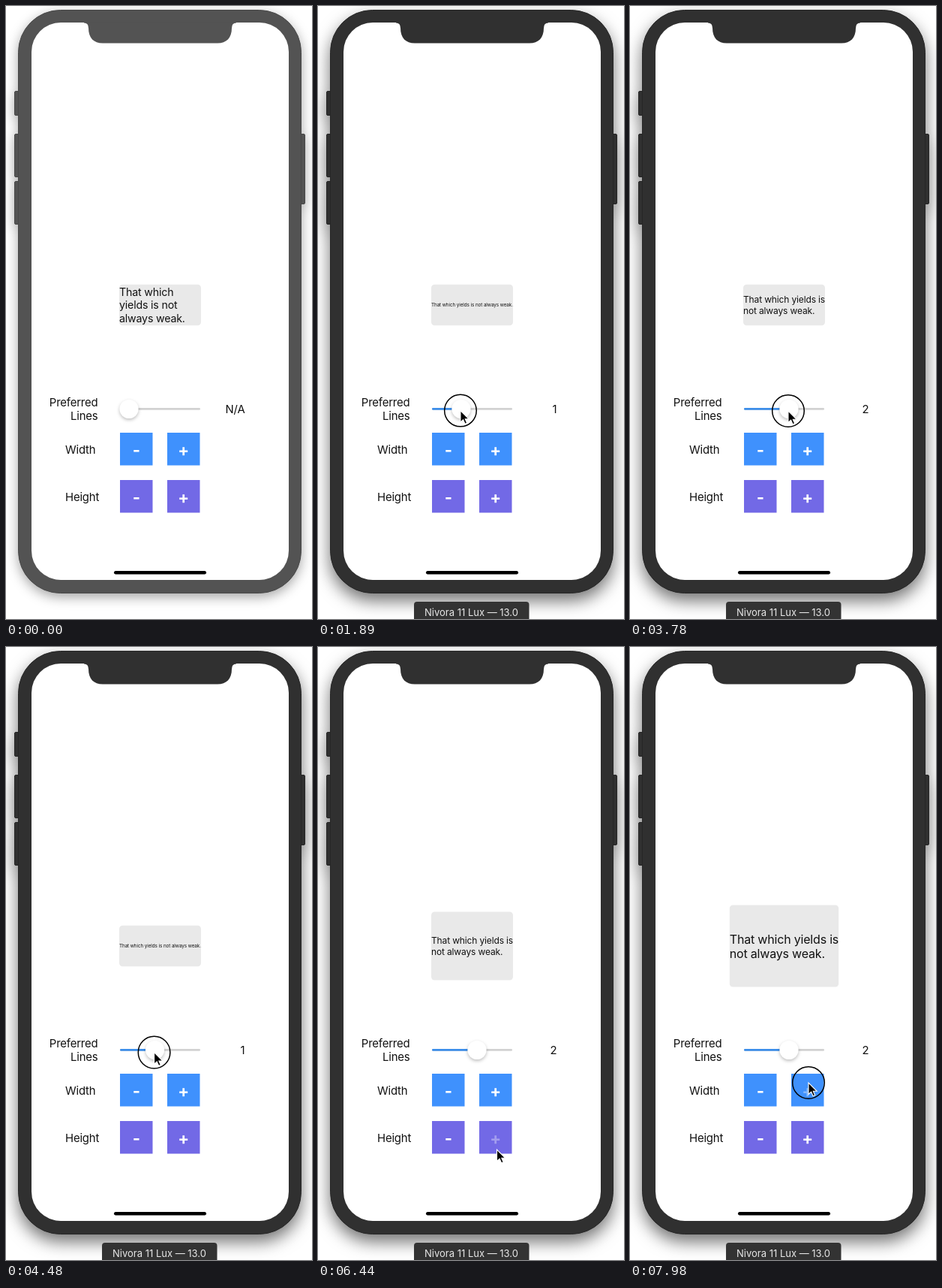
Recreate the animation shown at these times as an HTML page. Size 408 by 816 pixels, loop 8000 ms.

```html
<!DOCTYPE html>
<html lang="en">
<head>
<meta charset="utf-8">
<title>Preferred lines demo</title>
<style>
  html, body { margin: 0; width: 100%; height: 100%; overflow: hidden; background: #fff; }
  svg { display: block; width: 408px; height: 816px; }
  text { font: 14.9px Inter, "Liberation Sans", sans-serif; letter-spacing: -.012em; fill: #111; }
  .end { text-anchor: end; }
  .mid { text-anchor: middle; }
  .sign { font-size: 22px; font-weight: 700; fill: #fff; text-anchor: middle; }
  #phone { fill: #535353; stroke: #484848; filter: drop-shadow(0 5px 8px rgba(0,0,0,.35)); }
  #bezel { fill: #535353; }
  .active #phone { fill: #303030; stroke: #262626; filter: drop-shadow(0 10px 11px rgba(0,0,0,.55)); }
  .active #bezel { fill: #303030; }
  #tag { visibility: hidden; }
  .active #tag { visibility: visible; }
  #tag text { font-size: 13px; letter-spacing: 0; fill: #e8e8e8; }
  #knob { fill: #fff; filter: drop-shadow(0 2px 2px rgba(0,0,0,.25)); }
</style>
</head>
<body>
<svg id="stage" viewBox="0 0 408 816">
  <g id="phone">
    <rect x="11.5" y="113.5" width="8" height="32" rx="1.5"/>
    <rect x="11.5" y="170.5" width="8" height="57" rx="1.5"/>
    <rect x="11.5" y="233.5" width="8" height="57" rx="1.5"/>
    <rect x="390" y="170.5" width="8.5" height="93" rx="1.5"/>
    <rect x="16.5" y="5.5" width="377" height="776" rx="56"/>
  </g>
  <rect x="34" y="22" width="343" height="742" rx="39" fill="#fff"/>
  <path id="bezel" d="M104 21.5V22.5q6 0 6 7c0 13 7 20 19 20H282c12 0 19-7 19-20q0-7 6-7V21.5z"/>
  <rect x="144" y="752" width="123" height="4.5" rx="2.2"/>
  <g id="tag">
    <rect x="128" y="793" width="153.500" height="30" rx="4" fill="#333"/>
    <text class="mid" x="204.500" y="811.500">Nivora 11 Lux — 13.0</text>
  </g>

  <rect id="box" rx="4.500" fill="#e9e9e9"/>
  <g id="quote"><text></text><text></text><text></text></g>

  <text class="end" x="122.500" y="532.500">Preferred</text>
  <text class="end" x="122.500" y="550.500">Lines</text>
  <text x="79" y="595.500">Width</text>
  <text x="79" y="658.500">Height</text>
  <text class="end" x="318.500" y="542" id="value"></text>

  <rect x="152" y="535" width="107" height="2.800" rx="1.400" fill="#d2d2d2"/>
  <rect x="152" y="535" height="2.800" rx="1.400" fill="#3c8eea" id="fill"/>
  <circle id="knob" cy="536.500" r="12.600"/>

  <g fill="#3f91fd">
    <rect x="152" y="568" width="43.500" height="43.500"/>
    <rect x="215" y="568" width="43.500" height="43.500"/>
  </g>
  <g fill="#7269e6">
    <rect x="152" y="631" width="43.500" height="43.500"/>
    <rect x="215" y="631" width="43.500" height="43.500"/>
  </g>
  <text class="sign" x="173.700" y="598.500">-</text>
  <text class="sign" x="236.500" y="599" id="widthPlus">+</text>
  <text class="sign" x="173.700" y="661.500">-</text>
  <text class="sign" x="236.500" y="662" id="heightPlus">+</text>

  <g id="cursor">
    <circle id="ring" r="21.300" fill="none" stroke="#000" stroke-width="1.500"/>
    <path d="M0 0V15.500l3.600-3.300 2.500 5.600 2.600-1.100-2.400-5.400h4.900z" stroke="#fff" stroke-width="1.100"/>
  </g>
</svg>
<script>
const $ = id => document.getElementById(id);
const LOOP = 8000, ACTIVATE = 910, RELEASE = 4760;
const STEP = 18.2, RESIZE = 140, RING = 150, DIM = 280;
const heightClicks = [6020, 6230, 6650], widthClicks = [7420, 7840];

// Cursor path: time, x, y
const path = [
  [70, 240, 840], [840, 162.5, 536.5], [1260, 162.5, 536.5], [2030, 196, 539],
  [2660, 222.5, 539.5], [2870, 228, 540], [3080, 234, 540], [3430, 234, 540],
  [3780, 211, 539], [4270, 193, 539.5], [4410, 193, 539.5], [4690, 211, 540],
  [4760, 211, 540], [5040, 211, 562], [5320, 211, 562], [5950, 238.5, 669],
  [6750, 238.5, 669], [6930, 238, 650], [7300, 238, 580]
];
const layouts = {
  1: ["That which yields is not always weak."],
  2: ["That which yields is", "not always weak."],
  3: ["That which", "yields is not", "always weak."]
};
const quoteLines = [...$("quote").children];

const clamp = (v, a, b) => Math.min(b, Math.max(a, v));
const set = (el, attrs) => { for (const k in attrs) el.setAttribute(k, attrs[k]); };
const within = (t, clicks, span) => clicks.some(c => t >= c && t < c + span);
const grown = (t, clicks) => clicks.reduce((sum, c) => sum + STEP * clamp((t - c) / RESIZE, 0, 1), 0);

function cursorAt(t) {
  const i = path.findIndex(p => p[0] > t);
  if (i === 0) return path[0].slice(1);
  if (i < 0) return path[path.length - 1].slice(1);
  const [t0, x0, y0] = path[i - 1], [t1, x1, y1] = path[i];
  const u = (t - t0) / (t1 - t0);
  return [x0 + (x1 - x0) * u, y0 + (y1 - y0) * u];
}

// Width of a line per unit of font size
function unitWidth(str) {
  const el = quoteLines[0];
  el.textContent = str;
  el.style.fontSize = "100px";
  return el.getComputedTextLength() / 100;
}
const unit = { 1: unitWidth(layouts[1][0]), 2: unitWidth(layouts[2][0]) };

function drawQuote(count, left, width) {
  const size = count === 3 ? 14.2 : width / unit[count];
  const pitch = count === 3 ? 17.4 : size * 1.19;
  quoteLines.forEach((el, i) => {
    el.textContent = layouts[count][i] || "";
    el.style.fontSize = size + "px";
    set(el, { x: left, y: 398 + size * .385 + (i - (count - 1) / 2) * pitch });
  });
}

function draw(t) {
  const [x, y] = cursorAt(t);
  const dragX = t < ACTIVATE ? 0 : cursorAt(Math.min(t, RELEASE))[0] + 1;
  const knobX = clamp(dragX, 164, 246);
  const value = Math.floor((knobX - 164) / 82 * 4);
  const width = 109 + grown(t, widthClicks), height = 54.5 + grown(t, heightClicks);
  const left = 205.5 - width / 2;

  $("stage").classList.toggle("active", t >= ACTIVATE);
  set($("box"), { x: left, y: 398 - height / 2, width, height });
  drawQuote(value === 1 || value === 2 ? value : 3, left, width);
  $("value").textContent = value || "N/A";
  set($("knob"), { cx: knobX });
  set($("fill"), { width: knobX - 152 });
  set($("widthPlus"), { opacity: within(t, widthClicks, DIM) ? .35 : 1 });
  set($("heightPlus"), { opacity: within(t, heightClicks, DIM) ? .35 : 1 });
  set($("cursor"), { transform: `translate(${x} ${y})` });
  const pressed = (t >= ACTIVATE && t < RELEASE) || within(t, [...heightClicks, ...widthClicks], RING);
  set($("ring"), { visibility: pressed ? "visible" : "hidden" });
}

const start = performance.now();
function tick() {
  draw((performance.now() - start) % LOOP);
  requestAnimationFrame(tick);
}
tick();
</script>
</body>
</html>
```
